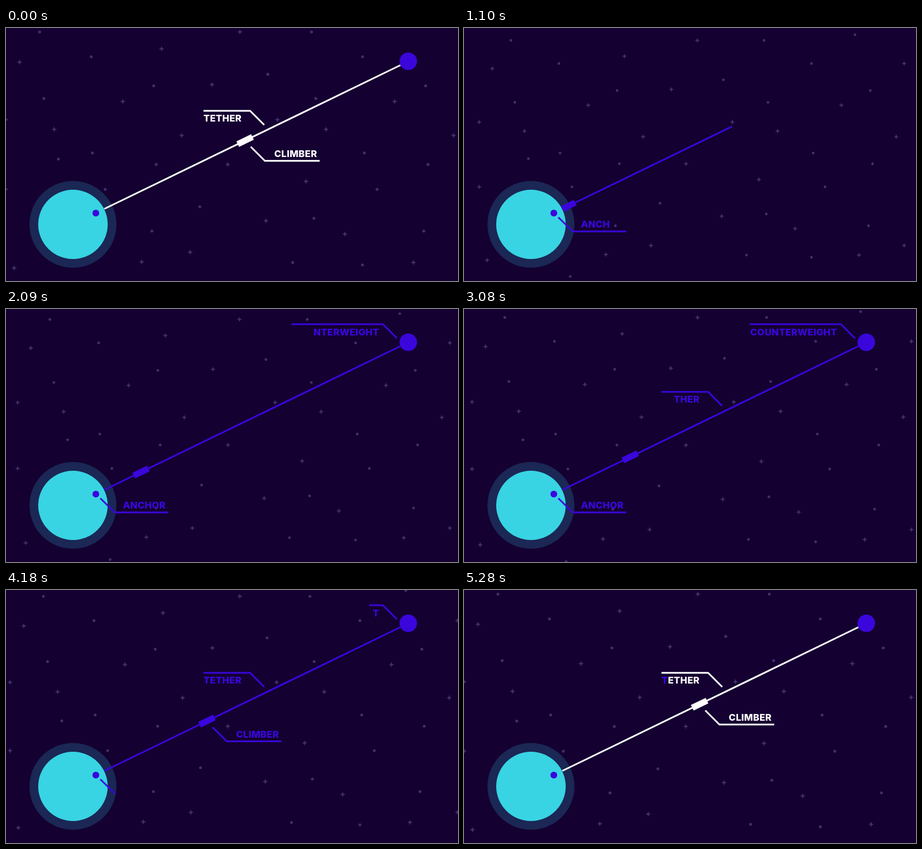
These frames come from a looping animation (800x449 px, 5.39 s). An HTML page:

```html
<!DOCTYPE html>
<html lang="en">
<head>
<meta charset="utf-8">
<title>Space elevator</title>
<style>
  html, body { margin: 0; width: 100%; height: 100%; overflow: hidden; background: #140031; }
  svg { display: block; width: 100%; height: 100%; }
  text { font: 800 16.5px Inter, "Open Sans", sans-serif; letter-spacing: .3px; font-kerning: none; }
</style>
</head>
<body>
<svg id="stage" viewBox="0 0 800 449"></svg>
<script>
const LOOP = 5390;
const RESTART = 620;            // the old scene is gone, the new one begins
const BLUE = '#3a06dc', WHITE = '#fff', STAR = '#40306a';
const TETHER = { x: 174, y: 321, dx: 524, dy: -255 };
const LENGTH = Math.hypot(TETHER.dx, TETHER.dy);

const clamp = v => Math.max(0, Math.min(1, v));
const ramp = (t, start, end) => clamp((t - start) / (end - start));
const smooth = p => p * p * (3 - 2 * p);
const mix = (a, b, p) => a + (b - a) * p;

function add(parent, tag, attrs = {}) {
  const node = document.createElementNS('http://www.w3.org/2000/svg', tag);
  set(node, attrs);
  return parent.appendChild(node);
}
function set(node, attrs) {
  for (const key in attrs) node.setAttribute(key, attrs[key]);
}

const stage = document.getElementById('stage');
add(stage, 'rect', { width: 800, height: 449, fill: '#140031' });

// Star field
const sparkles = [
  [50, 72], [284, 50], [413, 22], [367, 109], [220, 137], [27, 167], [107, 183], [317, 193],
  [475, 167], [555, 183], [668, 137], [779, 63], [765, 193], [27, 282], [393, 241], [522, 269],
  [456, 334], [586, 356], [699, 403], [779, 386], [331, 386], [251, 402], [41, 412]
];
const dots = [
  [83, 22], [168, 63], [271, 111], [90, 132], [459, 92], [531, 22], [615, 63], [692, 12],
  [538, 132], [719, 111], [170, 222], [114, 232], [275, 241], [191, 282], [618, 222], [723, 241],
  [639, 282], [347, 311], [268, 351], [535, 330], [716, 351], [615, 407], [500, 403], [188, 441]
];
const stars = add(stage, 'g', { fill: STAR });
for (const [x, y] of sparkles) {
  add(stars, 'path', { d: `M${x} ${y - 4.7}l1.3 3.4 3.4 1.3-3.4 1.3-1.3 3.4-1.3-3.4-3.4-1.3 3.4-1.3z` });
}
for (const [cx, cy] of dots) add(stars, 'circle', { cx, cy, r: 2.4 });

// Planet, anchor point and counterweight
const circle = (cx, cy, r, fill) => add(stage, 'circle', { cx, cy, r, fill });
circle(118.5, 348.5, 77, '#1b2754');
circle(118.5, 348.5, 61.5, '#38d4e3');
circle(159, 328.5, 6, BLUE);

// Tether and climber, drawn along the x axis of a rotated group
const angle = Math.atan2(TETHER.dy, TETHER.dx) * 180 / Math.PI;
const rail = add(stage, 'g', { transform: `translate(${TETHER.x} ${TETHER.y}) rotate(${angle})` });
const bar = (thickness, fill) => add(rail, 'rect', { y: -thickness / 2, height: thickness, fill });
const tetherBlue = bar(3, BLUE), tetherWhite = bar(3, WHITE);
const climberBlue = bar(11, BLUE), climberWhite = bar(11, WHITE);
const weight = circle(712, 59, 15.5, BLUE);

function span(rect, from, to) {
  set(rect, { x: from, width: Math.max(0, to - from) });
}

// Labels: a bent pointer line and a word that appears letter by letter
function makeLabel(word, d, x, y, times, backward = false) {
  const group = add(stage, 'g');
  const line = stroke => add(group, 'path', { d, stroke, fill: 'none', 'stroke-width': 3, pathLength: 1 });
  const blue = line(BLUE), white = line(WHITE);
  const text = add(group, 'text', { x, y });
  const letters = [...word].map(char => {
    const node = add(text, 'tspan');
    node.textContent = char;
    return node;
  });
  if (backward) letters.reverse();
  return { group, blue, white, letters, ...times };
}

const labels = [
  makeLabel('ANCHOR', 'M167 336L192.500 361H287', 207, 354, { start: 635, end: 4292 }),
  makeLabel('COUNTERWEIGHT', 'M692 52L667 27H505.500', 506.500, 46.500, { start: 1598, end: 4302 }, true),
  makeLabel('TETHER', 'M457 172L432 147H349.500', 349.500, 166, { start: 2615, end: 6000, whiten: 4720 }, true)
];
const climberLabel = makeLabel('CLIMBER', 'M10 11L35 36H132', 51.500, 29.500, { start: 3590, end: 6000, whiten: 4645 });
labels.push(climberLabel);

const lineShare = age => clamp(age / 400);
const textShare = age => clamp((age - 120) / 460);

function drawLabel(label, s) {
  const { start, end, whiten = Infinity, letters } = label;
  const closing = end - s < s - start;
  const age = Math.min(s - start, end - s);
  const shown = lineShare(age);
  const pale = Math.min(shown, lineShare(s - whiten));
  set(label.group, { visibility: age > 0 ? 'visible' : 'hidden' });
  set(label.blue, { 'stroke-dasharray': `0 ${pale} ${shown - pale} 3`, visibility: shown > pale ? 'inherit' : 'hidden' });
  set(label.white, { 'stroke-dasharray': `${pale} 3`, visibility: pale > 0 ? 'inherit' : 'hidden' });
  const round = closing ? Math.ceil : Math.floor;
  const count = round(textShare(age) * letters.length);
  const paleCount = Math.floor(textShare(s - whiten) * letters.length);
  letters.forEach((node, i) => set(node, { fill: i >= count ? 'none' : i < paleCount ? WHITE : BLUE }));
}

const zoomAt = s => 1 + 0.0741 * (s - 1100) / 4290;

function zoom(t) {
  if (t < 220) return zoomAt(t + LOOP);
  if (t < 1060) return mix(zoomAt(220 + LOOP), zoomAt(1060), smooth(ramp(t, 220, 1060)));
  return zoomAt(t);
}

function render(t) {
  const s = t < RESTART ? t + LOOP : t;

  const z = zoom(t);
  set(stars, { transform: `translate(400 225) scale(${z}) translate(-400 -225)` });

  const length = LENGTH * Math.min(ramp(s, 700, 1400), 1 - ramp(s, 5560, 6000));
  const pale = Math.min(length, LENGTH * ramp(s, 4320, 5020));
  span(tetherWhite, 0, pale);
  span(tetherBlue, pale, length);

  const climbX = 239 + 0.0558 * (Math.min(s, 5600) - 2090);
  const x = mix(climbX, 158, smooth(ramp(s, 5600, 6000)));
  const center = (x - TETHER.x) * LENGTH / TETHER.dx;
  const tail = Math.max(0, center - 14.5), nose = center + 14.5;
  const seam = s > 5020 ? nose : Math.max(tail, Math.min(nose, pale));
  span(climberWhite, tail, seam);
  span(climberBlue, seam, nose);

  set(weight, { r: 15.5 * smooth(Math.min(ramp(s, 1350, 1600), 1 - ramp(s, 5580, 5840))) });

  const y = TETHER.y + (x - TETHER.x) * TETHER.dy / TETHER.dx;
  set(climberLabel.group, { transform: `translate(${x} ${y})` });
  for (const label of labels) drawLabel(label, s);
}

const begin = performance.now();
function tick() {
  render((performance.now() - begin) % LOOP);
  requestAnimationFrame(tick);
}
tick();
</script>
</body>
</html>
```
